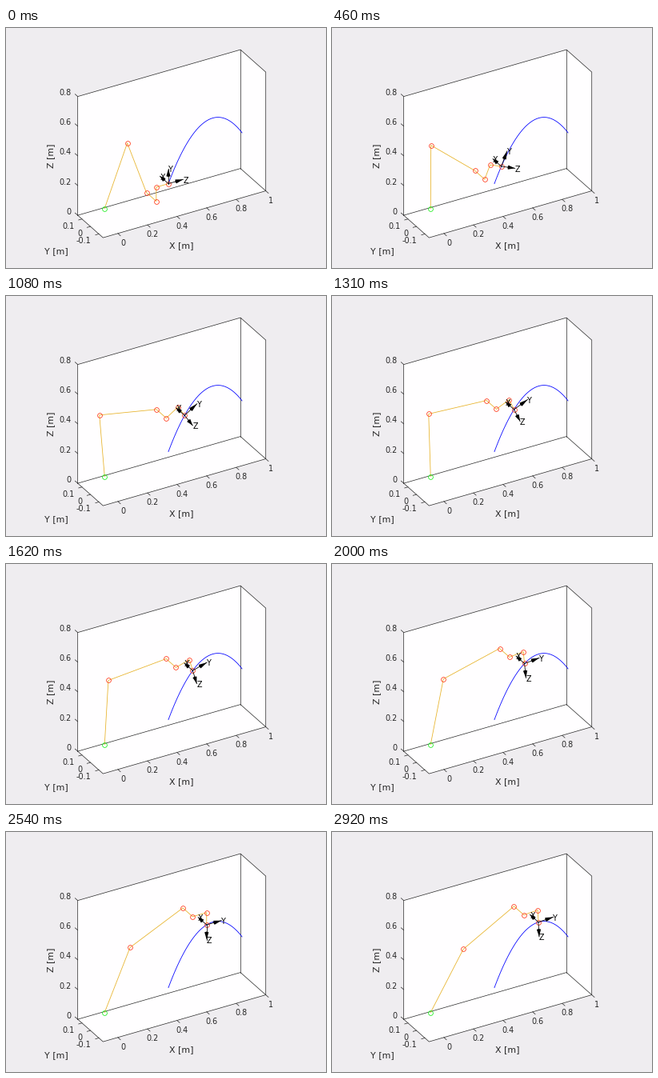
These frames come from a looping animation (400x300 px, 2990 ms). A matplotlib script:

```python
import numpy as np
import matplotlib.pyplot as plt
from matplotlib.animation import FuncAnimation

FRAMES, LOOP_MS = 39, 2990
PT = 0.72  # points per pixel at 100 dpi
INK = "#262626"

# Arm dimensions in metres
UPPER, FORE = 0.425, 0.39225
ARM_Y, HAND_Y = 0.007, -0.10915
WRIST, TOOL, BASE_Z = 0.09465, 0.0823, 0.0892
AXIS_LEN = 0.1

plt.rcParams["font.family"] = "DejaVu Sans"
fig = plt.figure(figsize=(4, 3), dpi=100, facecolor="#efedf0")
ax = fig.add_axes([0, 0, 1, 1])
ax.set_xlim(0, 400)
ax.set_ylim(300, 0)
ax.axis("off")


def project(x, y, z):
    """Orthographic view: metres to stage pixels."""
    return np.array([105.5 + 184.9 * (x + 0.1) - 105.5 * y,
                     248.1 - 53.2 * (x + 0.1) - 93.3 * y - 185.6 * z])


def line(pts, color, width=0.7, **kw):
    xs, ys = np.transpose(pts)
    return ax.plot(xs, ys, color=color, lw=width * PT, **kw)[0]


def label(x, y, s, size=9.6, **kw):
    kw = {"ha": "center", "va": "center_baseline", "color": INK, **kw}
    return ax.text(x, y, s, fontsize=size * PT, **kw)


def tick(pos, step, offset, s, ha):
    line([pos, pos + step], INK)
    label(*(pos + offset), s, ha=ha)


def draw_box():
    x0, x1, y0, y1, h = -0.1, 1, -0.15, 0.15, 0.8
    a, b, c, d = (project(*p, 0) for p in ((x0, y1), (x1, y1), (x1, y0), (x0, y0)))
    up = np.array([0, -185.6 * h])
    ax.fill(*np.transpose([a, a + up, b + up, c + up, c, d]), color="#fffeff", lw=0)
    for pts in ([a, a + up, b + up, c + up, c, d, a], [a, b, c], [b, b + up]):
        line(pts, INK)
    for v in np.arange(0, 1.01, 0.2):
        tick(project(v, y0, 0), (3.3, 2.9), (6.2, 11.2), f"{v:.1g}", "center")
    for v in (0.1, 0, -0.1):
        tick(project(x0, v, 0), (-4.2, 1.2), (-9.8, 7.9), f"{v:.1g}", "right")
    for v in np.arange(0, 0.81, 0.2):
        tick(project(x0, y1, v), (-3.3, -2.9), (-7.9, -5.4), f"{v:.1g}", "right")
    label(219.3, 271, "X [m]", 11)
    label(63, 277.7, "Y [m]", 11)
    label(56.2, 159.7, "Z [m]", 11, rotation=90, va="center")


def path(s):
    return np.array([0.365 + s, 0.21 + 2.376 * s - 3.965 * s * s])


def pose(k):
    """Joint positions and tool axes, solved back from the tool point."""
    phi = -np.radians(np.interp(k, [0, 6, 10, 17, 26, 33, 38],
                                [0, 23, 45, 66, 84.5, 90, 87]))
    tool = np.array([np.cos(phi), np.sin(phi)])
    side = np.array([-tool[1], tool[0]])
    tip = path(0.00783 * k)
    knuckle = tip - TOOL * tool
    wrist = knuckle - WRIST * side
    base = np.array([0, BASE_Z])
    reach = wrist - base
    r = np.hypot(*reach)
    bend = np.arccos((UPPER**2 + r**2 - FORE**2) / (2 * UPPER * r))
    lift = np.arctan2(reach[1], reach[0]) + bend
    elbow = base + UPPER * np.array([np.cos(lift), np.sin(lift)])
    flat = [(base, ARM_Y), (elbow, ARM_Y), (wrist, ARM_Y),
            (wrist, HAND_Y), (knuckle, HAND_Y), (tip, HAND_Y)]
    joints = np.array([project(p[0], y, p[1]) for p, y in flat])
    dirs = [(0, 1, 0), (side[0], 0, side[1]), (tool[0], 0, tool[1])]
    zero = project(0, 0, 0)
    axes = [AXIS_LEN * (project(*d) - zero) for d in dirs]
    return joints, axes


def cone(start, vec):
    length = np.hypot(*vec)
    along = vec / length
    across = np.array([-along[1], along[0]])
    back = start + 0.5 * vec
    return [start + vec, back + 2.6 * across, back - 0.8 * along, back - 2.6 * across]


draw_box()
curve = path(np.linspace(0, 0.498, 80))
line(project(curve[0], HAND_Y, curve[1]).T, "#0000ff", 0.8)

blank = np.zeros((2, 2))
links = line(blank, "#e8b32a", 0.8)
ring = dict(ls="", marker="o", ms=5.8 * PT, mfc="none", mew=0.8 * PT)
base_dot = line(blank, "none", mec="#20f020", **ring)
dots = line(blank, "none", mec="#ff3c1e", **ring)
shafts = [line(blank, "black", 0.8) for _ in "XYZ"]
heads = [ax.fill([0, 0, 0], [0, 0, 0], color="black", lw=0, zorder=3)[0] for _ in "XYZ"]
names = [label(0, 0, c, ha="left", color="black") for c in "XYZ"]


def update(k):
    joints, axes = pose(k)
    links.set_data(*joints.T)
    base_dot.set_data(*joints[:1].T)
    dots.set_data(*joints[1:].T)
    tip = joints[-1]
    for vec, shaft, head, name in zip(axes, shafts, heads, names):
        shaft.set_data(*np.transpose([tip, tip + vec]))
        head.set_xy(cone(tip, vec))
        name.set_position(tip + vec + (-0.2, 0.3))
    return [links, base_dot, dots, *shafts, *heads, *names]


anim = FuncAnimation(fig, update, frames=FRAMES, interval=LOOP_MS / FRAMES,
                     init_func=lambda: update(0), repeat=True, repeat_delay=0)
plt.show()
```
